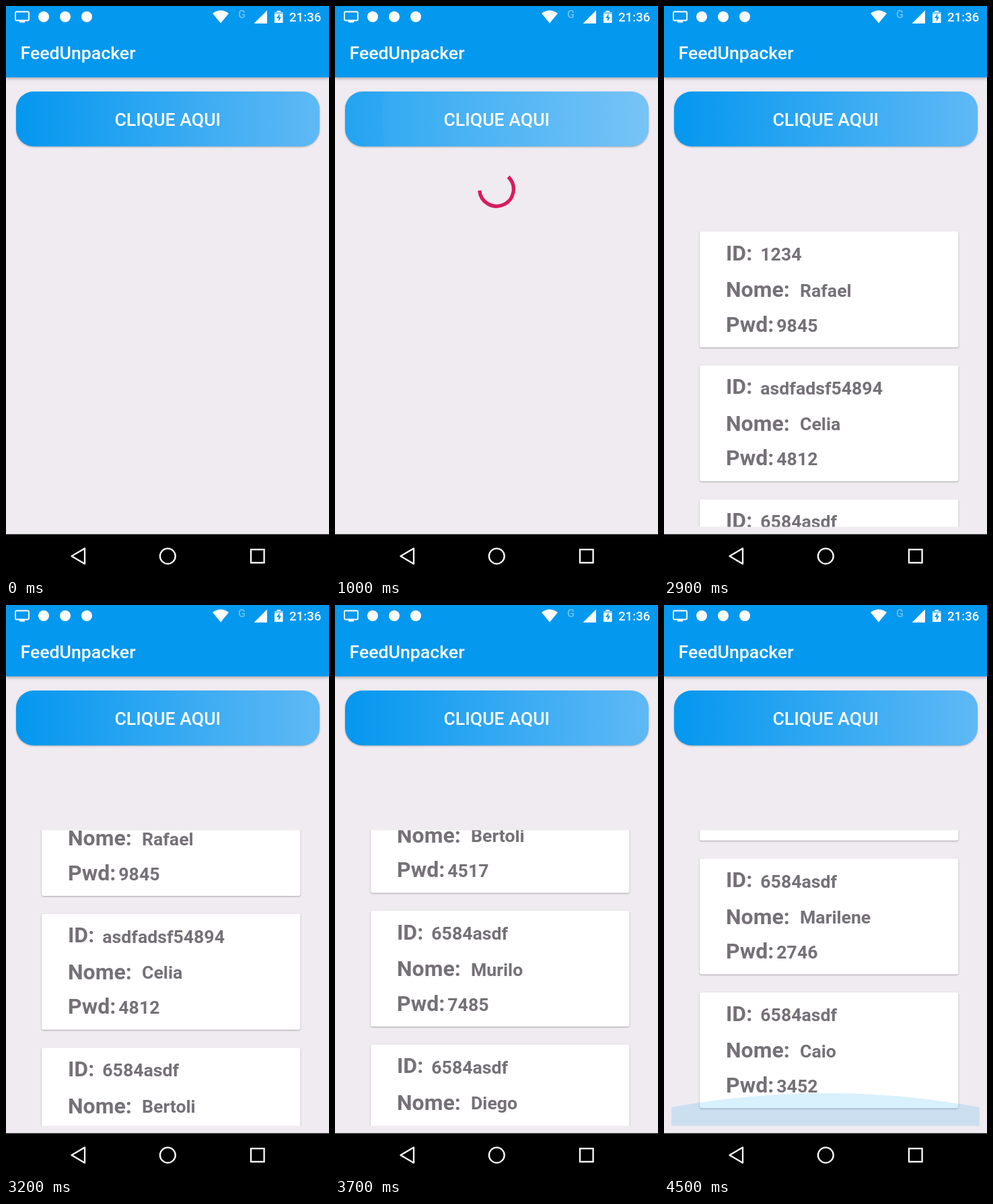
Write an HTML page that moves like this. It is 480 by 848 pixels and loops after 4600 ms.

```html
<!DOCTYPE html>
<html lang="pt">
<head>
<meta charset="utf-8">
<title>FeedUnpacker</title>
<style>
  html, body { margin: 0; width: 100%; height: 100%; overflow: hidden; background: #efebf0; }
  svg { display: block; width: 100%; height: 100%; }
  text { font-family: Roboto, "Liberation Sans", sans-serif; font-weight: 500; font-size: 26.67px; fill: #fff; }
  .list text { font-weight: 700; fill: #757177; }
  .list .label { font-size: 32px; }
  .card { fill: #fff; filter: drop-shadow(0 1.6px 1.3px rgba(0, 0, 0, .3)); }
  .bar { fill: #0598ef; filter: drop-shadow(0 2px 2px rgba(0, 0, 0, .28)); }
  .button { filter: drop-shadow(0 1.6px 1.3px rgba(0, 0, 0, .28)); }
  .line { fill: none; stroke: #fff; stroke-width: 2.3; }
</style>
</head>
<body>
<svg viewBox="0 0 480 848">
  <defs>
    <linearGradient id="blue">
      <stop offset="0" stop-color="#0597ef"/>
      <stop offset="1" stop-color="#5fb9f5"/>
    </linearGradient>
    <clipPath id="view"><rect x="11" y="334.5" width="458" height="439"/></clipPath>
    <clipPath id="pill"><rect x="15" y="127" width="451" height="81.5" rx="26"/></clipPath>
  </defs>
  <rect width="480" height="848" fill="#efebf0"/>

  <rect class="bar" y="-10" width="480" height="116"/>
  <text x="21.5" y="79">FeedUnpacker</text>

  <!-- status bar -->
  <g fill="#fff">
    <rect class="line" x="14" y="8.5" width="20" height="13" rx="1.5" style="stroke-width:1.8"/>
    <rect x="20" y="22" width="8" height="2.6"/>
    <circle cx="56" cy="16" r="8"/>
    <circle cx="88" cy="16" r="8"/>
    <circle cx="120" cy="16" r="8"/>
    <path d="M307 11Q319 2 331 11L319 25.5Z"/>
    <path d="M388 6.5V26H368.500Z"/>
    <path d="M402.500 9V7H408V9H411.500V25H399V9Z"/>
    <path d="M406.500 11.500L402 18H405V23L409 16.500H406.500Z" fill="#0598ef"/>
    <rect x="399" y="9" width="12.5" height="3" fill="#0598ef" opacity=".45"/>
  </g>
  <text x="345" y="18" style="font-size:16px;opacity:.4">G</text>
  <text x="421" y="23" style="font-size:18.67px">21:36</text>

  <!-- button -->
  <rect class="button" x="15" y="127" width="451" height="81.5" rx="26" fill="url(#blue)"/>
  <g id="press" clip-path="url(#pill)" fill="#fff">
    <rect x="15" y="127" width="451" height="82" opacity=".12"/>
    <circle id="ripple" cx="300" cy="168" opacity=".03"/>
  </g>
  <text x="240.3" y="177.500" text-anchor="middle">CLIQUE AQUI</text>

  <path id="spinner" fill="none" stroke="#d81b60" stroke-width="5.3"/>

  <g id="list" class="list" clip-path="url(#view)">
    <g id="cards"></g>
    <path id="glow" fill="#0598ef" opacity=".15"/>
  </g>

  <!-- navigation bar -->
  <rect y="784.500" width="480" height="64"/>
  <path class="line" d="M97.500 817L117 805.500V828.500Z" stroke-linejoin="round"/>
  <circle class="line" cx="240.300" cy="817" r="11.400"/>
  <rect class="line" x="364" y="807.200" width="19.600" height="19.600"/>
</svg>
<script>
const LOOP = 4600, STEP = 100, PITCH = 198.7;
const $ = id => document.getElementById(id);

const people = [
  ['1234', 'Rafael', '9845'],
  ['asdfadsf54894', 'Celia', '4812'],
  ['6584asdf', 'Bertoli', '4517'],
  ['6584asdf', 'Murilo', '7485'],
  ['6584asdf', 'Diego', '8459'],
  ['6584asdf', 'Marilene', '2746'],
  ['6584asdf', 'Caio', '3452']
];

// [time, value] pairs
const scroll = [[3000, 0], [3100, 20], [3200, 75], [3300, 170], [3400, 280], [3500, 366],
  [3600, 430], [3700, 477], [3800, 510], [3900, 528], [4000, 528], [4100, 553],
  [4200, 660], [4300, 800], [4400, 925], [4500, 952]];
const press = [[500, 0], [600, .5], [700, .85], [800, 1], [1100, 1], [1200, .7], [1300, .4], [1400, .15], [1500, 0]];

function at(keys, t) {
  const i = keys.findIndex(k => k[0] > t);
  if (i === 0) return keys[0][1];
  if (i < 0) return keys[keys.length - 1][1];
  const [t0, a] = keys[i - 1], [t1, b] = keys[i];
  return a + (b - a) * (t - t0) / (t1 - t0);
}

const write = (x, y, s, cls = '') => `<text class="${cls}" x="${x}" y="${y}">${s}</text>`;

$('cards').innerHTML = people.map(([id, name, pwd], i) =>
  `<g transform="translate(0 ${335 + i * PITCH})">
    <rect class="card" x="53" width="384.500" height="172" rx="2.700"/>
    ${write(92, 42.5, 'ID:', 'label')}${write(143.3, 43, id)}
    ${write(92, 97.3, 'Nome:', 'label')}${write(202, 96.5, name)}
    ${write(92, 148.5, 'Pwd:', 'label')}${write(167.3, 148.5, pwd)}
  </g>`).join('');

// Spinner sweep easing: a Bezier with x 0, .2, .1, .5 and y 0, 0, 1, 1
function grow(x) {
  if (x >= .5) return 1;
  let lo = 0, hi = 1;
  for (let i = 0; i < 20; i++) {
    const u = (lo + hi) / 2, v = 1 - u;
    if (.6 * u * v * v + .3 * u * u * v + .5 * u ** 3 < x) lo = u; else hi = u;
  }
  return lo * lo * (3 - 2 * lo);
}

function arc(ms) {
  const from = -Math.PI / 2 + 2 * Math.PI * (ms / 5332 + ms * 2 / 6665 / 2 * 1.0 + ms * 0);
  const to = from + 1.5 * Math.PI * grow(ms / 1333);
  const point = a => `${240 + 25.3 * Math.cos(a)} ${272 + 25.3 * Math.sin(a)}`;
  return `M${point(from)}A25.3 25.3 0 ${to - from > Math.PI ? 1 : 0} 1 ${point(to)}`;
}

function draw(time) {
  const t = Math.floor(time % LOOP / STEP) * STEP;
  const spinning = t >= 700 && t < 1200;
  $('spinner').setAttribute('d', spinning ? arc(t - 640) : '');
  $('press').setAttribute('opacity', at(press, t));
  $('ripple').setAttribute('r', Math.max(0, (t - 540) / 2));
  $('list').style.display = t >= 1200 ? '' : 'none';
  $('cards').setAttribute('transform', `translate(0 ${-at(scroll, t)})`);
  $('glow').setAttribute('d', t >= 4500 ? 'M11 774V746Q240 704 469 746V774Z' : '');
}

const start = performance.now();
function tick() {
  draw(performance.now() - start);
  requestAnimationFrame(tick);
}
draw(0);
requestAnimationFrame(tick);
</script>
</body>
</html>
```
